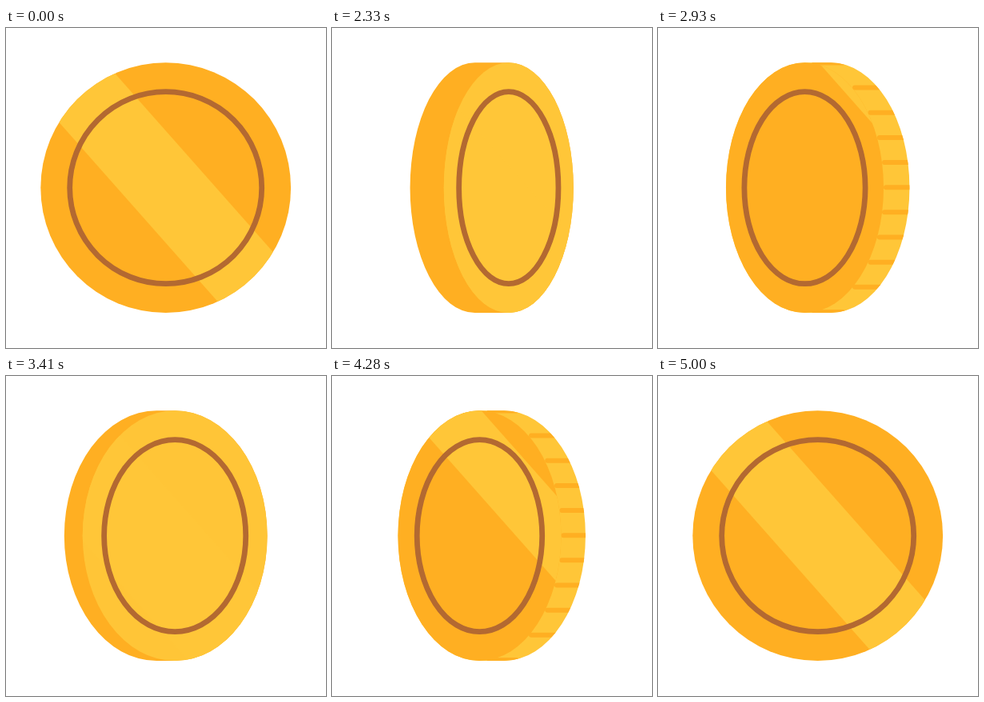
An HTML page with a canvas for the animation above (5030 ms loop, 400x400 px).

```html
<!DOCTYPE html>
<html lang="en">
<head>
<meta charset="utf-8">
<title>Spinning coin</title>
<style>
  html, body { margin: 0; width: 100%; height: 100%; overflow: hidden; background: #fff; }
  canvas { display: block; width: 100vw; height: 100vh; object-fit: contain; }
</style>
</head>
<body>
<canvas id="stage" width="400" height="400"></canvas>
<script>
const ctx = document.getElementById('stage').getContext('2d');

const LOOP = 5030, REST = 2000, STEP = 30;
const C = 199.7, R = 156.4, RING = 120;
const DEPTH = 0.28 * R;
const SLOPE = 1.13;
const ORANGE = [255, 175, 34], LIGHT = [255, 198, 56], BROWN = '#b36931';

// Time since the spin starts (ms) and quarter turns made
const TURNS = [
  [0, 0], [30, 0.0125], [330, 0.482], [600, 1], [930, 1.63], [1080, 1.87], [1200, 2],
  [1410, 2.262], [2160, 3.506], [2280, 3.652], [2700, 3.938], [3000, 4]
];

const clamp = x => Math.max(0, Math.min(1, x));

function mix(a, b, k) {
  return `rgb(${a.map((v, i) => Math.round(v + (b[i] - v) * k)).join(',')})`;
}

function secant(i) {
  const [t0, u0] = TURNS[i], [t1, u1] = TURNS[i + 1];
  return (u1 - u0) / (t1 - t0);
}

// Harmonic mean keeps the curve monotone
function tangent(i) {
  if (i === 0 || i === TURNS.length - 1) return 0;
  const a = secant(i - 1), b = secant(i);
  return 2 * a * b / (a + b);
}

function turnsAt(t) {
  let i = 0;
  while (i < TURNS.length - 2 && t > TURNS[i + 1][0]) i++;
  const [t0, u0] = TURNS[i], [t1, u1] = TURNS[i + 1];
  const h = t1 - t0, x = clamp((t - t0) / h), y = 1 - x;
  return u0 * y * y * (1 + 2 * x) + u1 * x * x * (3 - 2 * x)
    + h * x * y * (tangent(i) * y - tangent(i + 1) * x);
}

function ellipse(x, w, h) {
  ctx.beginPath();
  ctx.ellipse(x, C, w, h, 0, 0, Math.PI * 2);
}

function drawRim(face, back, w, lit) {
  const left = Math.min(face, back), right = Math.max(face, back);
  ctx.save();
  ctx.beginPath();
  ctx.ellipse(left, C, w, R, 0, Math.PI / 2, Math.PI * 1.5);
  ctx.lineTo(right, C - R);
  ctx.ellipse(right, C, w, R, 0, -Math.PI / 2, Math.PI / 2);
  ctx.closePath();
  ctx.fillStyle = mix(ORANGE, LIGHT, lit);
  ctx.fill();
  if (lit > 0) {
    ctx.clip();
    ctx.strokeStyle = mix(ORANGE, LIGHT, 0);
    ctx.lineWidth = 6;
    ctx.lineCap = 'round';
    for (let k = -5; k <= 5; k++) {
      const dy = k * 31.15;
      const edge = w * Math.sqrt(Math.max(0, 1 - (dy / R) ** 2));
      // Ridges run from the face to the outer edge
      const from = face < back ? face + edge + 3 : left - edge - 6;
      const to = face < back ? right + edge + 6 : face - edge - 3;
      ctx.beginPath();
      ctx.moveTo(from, C + dy - 0.5);
      ctx.lineTo(to, C + dy - 0.5);
      ctx.stroke();
    }
  }
  ctx.restore();
}

function drawFace(x, w, base, shine, band) {
  if (w < 0.3) return;
  ctx.save();
  ellipse(x, w, R);
  ctx.fillStyle = base;
  ctx.fill();
  ctx.clip();

  const lean = 200 / SLOPE, a = x + shine;
  ctx.beginPath();
  ctx.moveTo(a - lean, C - 200);
  ctx.lineTo(a + band - lean, C - 200);
  ctx.lineTo(a + band + lean, C + 200);
  ctx.lineTo(a + lean, C + 200);
  ctx.closePath();
  ctx.fillStyle = mix(LIGHT, LIGHT, 0);
  ctx.fill();

  ellipse(x, RING * w / R, RING);
  ctx.strokeStyle = BROWN;
  ctx.lineWidth = 6.8;
  ctx.stroke();
  ctx.restore();
}

function draw(time) {
  const t = time % LOOP;
  const spin = Math.max(0, Math.floor((t - REST) / STEP) * STEP);
  const u = turnsAt(spin);
  const half = u % 2;
  const leaving = half < 1;
  const v = leaving ? half : 2 - half;
  const w = R * (1 - v);
  const off = DEPTH * v * (leaving ? 1 : -1);

  let shine, band, base;
  if (leaving) {
    shine = -61 - 230 * v;
    band = 124 + 150 * v;
    base = mix(ORANGE, LIGHT, clamp(v / 0.28));
  } else {
    shine = -61 + (u < 2 ? 586 : 306) * v;
    band = 124 - 83 * v;
    base = mix(ORANGE, LIGHT, 0);
  }

  ctx.fillStyle = '#fff';
  ctx.fillRect(0, 0, 400, 400);
  if (v > 0) drawRim(C + off, C - off, w, clamp((half - 0.75) / 0.5));
  drawFace(C + off, w, base, shine, band);
}

let start;
function tick(now) {
  if (start === undefined) start = now;
  draw(now - start);
  requestAnimationFrame(tick);
}
draw(0);
requestAnimationFrame(tick);
</script>
</body>
</html>
```
